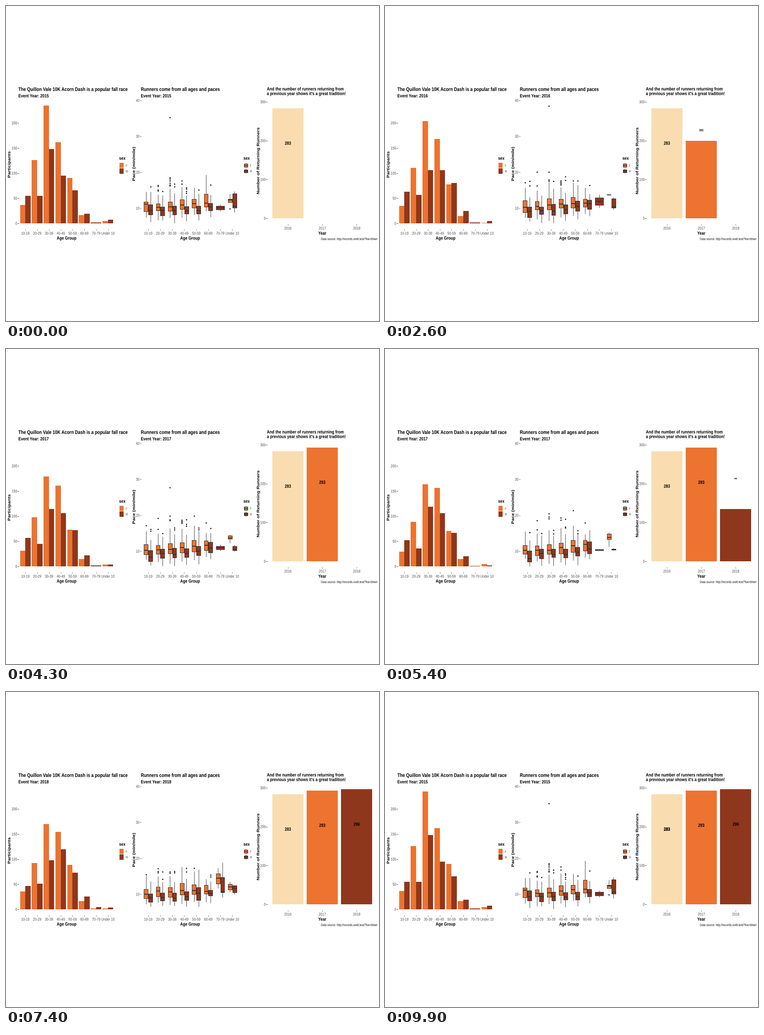
A matplotlib script for the animation above (10000 ms loop, 815 by 687 pixels).

```python
import numpy as np
import matplotlib.pyplot as plt
from matplotlib.animation import FuncAnimation
from matplotlib.collections import LineCollection, PolyCollection
from matplotlib.patches import PathPatch, Rectangle
from matplotlib.path import Path
from matplotlib.textpath import TextPath
from matplotlib.transforms import Affine2D

W, H, DPI = 815, 687, 64
FRAMES, INTERVAL = 100, 100
PX = 72 / DPI          # one pixel in points
ASPECT = 1.22          # the whole plot is taller than wide by this much

CREAM, ORANGE, BROWN = "#f9ddb0", "#ec7330", "#8f371c"
INK, AXIS = "#333333", "#4d4d4d"
AGES = ["10-19", "20-29", "30-39", "40-49", "50-59", "60-69", "70-79", "Under 10"]
YEARS = [2015, 2016, 2017, 2018]
WINDOWS = [(8, 25), (34, 49), (58, 74), (83, 99)]   # frames of each year change

# Runners per age group
WOMEN = [
    [37, 126, 234.5, 162, 90, 16, None, 5],
    [35, 111, 203.5, 168, 78, 15, None, 1],
    [29, 89, 163.5, 156, 70, 15, None, 5],
    [36, 92, 170, 154, 89, 16, 2, 2],
]
MEN = [
    [55, 55, 148, 95, 66, 19, 2, 7],
    [63, 57, 106, 106, 80, 25, 2, 5],
    [52, 36, 119, 106, 67, 20, 1, 2],
    [47, 51, 98, 120, 73, 26, 5, 4],
]

# Pace rows: low, quartiles, high, then any outliers
PACE_2015 = [
    [(7.4, 9.1, 11.1, 11.8, 14.6),
     (6.7, 9.4, 10.3, 11.3, 13.8, 16.4, 16.1, 15.1, 14.8),
     (7.3, 9.2, 10.4, 11.8, 15.5, 35.2, 18.1, 18.5, 17.6, 17, 16.5, 16.2),
     (7.4, 9.7, 10.9, 12.4, 15.9, 17.7, 16.8),
     (8.2, 10.1, 11.3, 12.6, 15.7),
     (9.2, 10.4, 11.4, 14, 19.3),
     None,
     (11.6, 11.6, 12.3, 12.5, 14, 9.9)],
    [(6.2, 8.2, 9.4, 11, 14.6, 16),
     (6.7, 7.9, 9.3, 10.4, 13.6, 14.7),
     (5.9, 8.2, 9.4, 10.6, 14.2, 16.8, 16),
     (6.4, 8.5, 9.2, 10.5, 13.6, 15.7, 15.3, 14.7, 14.2),
     (6.7, 8.5, 9.4, 10.7, 14.1, 15.1),
     (7.6, 9.4, 10.4, 11.4, 13.7, 16.5),
     (9.2, 9.6, 10.1, 10.6, 11),
     (8.9, 10.1, 10.5, 14.1, 14.7)],
]
PACE_2016 = [
    [(7.5, 8.9, 10.3, 12.2, 15.7, 17.1),
     (6.9, 9.6, 10.5, 11.9, 15, 20.1, 16.3),
     (6.6, 9.6, 10.9, 12.7, 17.2, 20.1, 38.5, 17.9, 17.5),
     (7.5, 10.1, 11.1, 12.5, 15.9, 17.7, 17.3, 16.9, 16.5),
     (7.9, 10.1, 11.3, 13, 17.1, 17.6),
     (8.5, 10.4, 11.4, 12.6, 15.7),
     None,
     (13.7, 13.7, 13.7, 13.7, 13.7)],
    [(6.3, 7.4, 9.1, 10.4, 13.2, 17.5, 16.2),
     (5.9, 8.3, 9.3, 10.4, 13.6),
     (5.9, 8.1, 9.2, 11.2, 15.5, 17.5),
     (6.5, 8.5, 9.6, 11, 14.3, 18.8, 17.8),
     (6.9, 9.2, 10.5, 12, 16.5, 17.6),
     (7.8, 9.8, 11.3, 12.3, 14, 16.4),
     (10.1, 10.9, 11.9, 12.9, 13.8),
     (9.6, 10.1, 10.4, 12.7, 13.1)],
]
PACE_2017 = [
    [(7.9, 9.2, 10.2, 11.7, 15.5),
     (7.2, 8.9, 10.3, 11.5, 15, 18.6, 16),
     (6.5, 9.2, 10.3, 11.9, 15.9, 19.6, 20.5, 19),
     (7, 9.4, 11, 12.3, 16.5, 19.3, 18.7),
     (7.4, 9.8, 11.5, 13, 17.1, 21.4),
     (8.4, 10.1, 11.9, 13.1, 14.7, 17.9),
     None,
     (11.3, 13.3, 13.8, 14.8, 15.2)],
    [(5.8, 7.1, 7.9, 10.1, 13.1, 15.2),
     (6, 8, 9.4, 10.7, 14.5, 15),
     (5.9, 8.3, 9.1, 10.6, 14.3, 15.9, 14.9),
     (6.2, 8.2, 9.1, 10.6, 14.8, 18.9, 16.5, 16.7),
     (6.2, 8.7, 9.7, 11.1, 15, 15.8, 15),
     (7.8, 9.4, 10.6, 12.7, 15.9),
     (10.2, 10.3, 10.4, 10.5, 10.7),
     (10.2, 10.4, 10.4, 10.6, 10.9)],
]
PACE_2018 = [
    [(7.3, 8.9, 10, 11.4, 15.1, 15.5),
     (7.7, 9.4, 10.9, 12, 15, 17.1, 16.4, 16),
     (7.1, 9.2, 10.7, 11.9, 15.1, 16.3, 15.9),
     (7.3, 9.9, 11, 13.1, 17.6),
     (7.9, 10, 11, 12.7, 16.4, 17.3),
     (7.8, 10.1, 10.8, 12.6, 14.2),
     (11.6, 12.9, 14.5, 15.7, 17.3),
     (10.6, 11.3, 12, 12.8, 13.6)],
    [(6.6, 7.8, 9, 10.1, 13.6),
     (6.8, 8.2, 9.1, 10.4, 13.4, 16.3, 14.2),
     (6.8, 8.1, 8.9, 10.4, 13.4, 16.4, 16),
     (6.6, 8.3, 9.4, 10.8, 14.3, 17.3, 16.3),
     (6.6, 8.3, 10.3, 11.9, 16.9),
     (7.6, 9.6, 10.3, 11.1, 13.6, 15.3, 14.9),
     (9.1, 10.5, 10.6, 14.7, 18.8),
     (10, 10.5, 11.7, 12.4, 12.5)],
]
PACES = [PACE_2015, PACE_2016, PACE_2017, PACE_2018]

fig = plt.figure(figsize=(W / DPI, H / DPI), dpi=DPI, facecolor="white")
ax = fig.add_axes([0, 0, 1, 1])
ax.set_xlim(0, W)
ax.set_ylim(H, 0)
ax.axis("off")


def count_y(n):
    return 474 - 1.0945 * n


def pace_y(v):
    return 441 - 7.84 * (np.asarray(v) - 10)


def return_y(n):
    return 463 - 0.8465 * n


def glyphs(s, x, y, size, bold=False, ha="left", turn=0, mid=False):
    font = {"family": "Liberation Sans", "weight": "bold" if bold else "normal"}
    path = TextPath((0, 0), s, size=size, prop=font)
    (x0, y0), (x1, y1) = path.vertices.min(axis=0), path.vertices.max(axis=0)
    dx = {"left": 0, "center": -(x0 + x1) / 2, "right": -x1}[ha]
    dy = -(y0 + y1) / 2 if mid else 0
    move = Affine2D().translate(dx, dy).rotate_deg(turn).scale(1, -ASPECT).translate(x, y)
    return move.transform_path(path)


# Static text and ticks are gathered here and added as a few artists
texts = {"black": [], AXIS: []}
ticks = []


def text(*args, color="black", **style):
    texts[color].append(glyphs(*args, **style))


def ink(path, color="black"):
    return ax.add_artist(PathPatch(path, facecolor=color, linewidth=0, zorder=5))


def rect(x, y, w, h, color, **style):
    style = {"linewidth": 0, **style}
    return ax.add_artist(Rectangle((x, y), w, h, facecolor=color, **style))


def lines(segments, width, z):
    group = LineCollection(segments, colors=INK, linewidths=width * PX, zorder=z)
    return ax.add_collection(group, autolim=False)


def y_axis(x, values, to_y):
    for v in values:
        y = float(to_y(v))
        ticks.append([(x - 2.5, y), (x, y)])
        text(str(v), x - 3.5, y, 7.2, ha="right", mid=True, color=AXIS)


def x_axis(y, centers, names):
    for x, name in zip(centers, names):
        ticks.append([(x, y), (x, y + 2.5)])
        text(name, x, y + 11.8, 7.15, ha="center", color=AXIS)


# Static parts
bar_x = 42.2 + 25.77 * np.arange(8)
box_x = 310.6 + 26.25 * np.arange(8)
year_x = 615.8 + 75.2 * np.arange(3)
BAR_HALF, BOX_HALF, RETURN_W = 11.6, 9.8, 68

text("The Quillon Vale 10K Acorn Dash is a popular fall race", 27, 185.3, 9.3, bold=True)
text("Runners come from all ages and paces", 294.6, 185.3, 9.3, bold=True)
text("And the number of runners returning from", 570, 184.2, 8.38, bold=True)
text("a previous year shows it's a great tradition!", 570, 194.3, 8.38, bold=True)
text("Participants", 9.6, 346, 8.3, bold=True, ha="center", turn=90)
text("Pace (min/mile)", 282, 344.7, 8.35, bold=True, ha="center", turn=90)
text("Number of Returning Runners", 553.6, 338, 8.35, bold=True, ha="center", turn=90)
text("Age Group", 132.2, 509.5, 8.35, bold=True, ha="center")
text("Age Group", 402, 509.5, 8.35, bold=True, ha="center")
text("Year", 691, 498.8, 8.35, bold=True, ha="center")
text("Data source: http://records.ovelt.test/?kw=bhwrr", 812, 510.4, 5.85, ha="right")

y_axis(27.7, [0, 50, 100, 150, 200], count_y)
y_axis(295, [10, 20, 30, 40], pace_y)
y_axis(570.7, [0, 100, 200, 300], return_y)
x_axis(486.8, bar_x, AGES)
x_axis(486.8, box_x, AGES)
x_axis(475.7, year_x, ["2016", "2017", "2018"])

text("sex", 247.2, 335.3, 8.3, bold=True)
text("sex", 518.8, 335.3, 8.3, bold=True)
key_mids = []
for y, name, color in [(347.7, "F", ORANGE), (359.9, "M", BROWN)]:
    rect(247.8, y - 5.7, 9.4, 11.4, color)
    rect(520.2, y - 3.4, 7.6, 6.8, color, edgecolor=INK, linewidth=PX, zorder=3)
    ticks.append([(524, y - 5.5), (524, y + 5.5)])
    key_mids.append([(520, y), (528, y)])
    text(name, 261.6, y + 2.8, 5.8, color=AXIS)
    text(name, 532.8, y + 2.8, 5.8, color=AXIS)

for color, paths in texts.items():
    ink(Path.make_compound_path(*paths), color)
lines(ticks, 0.9, 2)
lines(key_mids, 1.6, 4)

# Moving parts
subtitle_paths = {
    year: Path.make_compound_path(*[
        glyphs(f"Event Year: {year}", x, 199.3, 8.37, bold=True) for x in (27, 294.6)])
    for year in YEARS}
subtitle = ink(subtitle_paths[2015])
bars = [[rect(0, 0, 0, 0, c) for _ in AGES] for c in (ORANGE, BROWN)]
whiskers = lines([], 0.9, 2)
boxes = ax.add_collection(
    PolyCollection([], edgecolors=INK, linewidths=PX, zorder=3), autolim=False)
medians = lines([], 1.9, 4)
dots = ax.scatter([], [], s=(2.9 * PX) ** 2, color="#222222", linewidths=0, zorder=4)

RETURNS = [283, 293, 296]
LIFTS = [62, 62, 10]
columns = [rect(x - RETURN_W / 2, 463, RETURN_W, 0, c)
           for x, c in zip(year_x, (CREAM, ORANGE, BROWN))]
label_paths = [glyphs(str(n), 0, 0, 8.2, bold=True, ha="center", mid=True)
               for n in RETURNS]
labels = [ink(path) for path in label_paths]
echo = ink(label_paths[0])


def lerp(a, b, p):
    return a + (b - a) * p


def ramp(frame, start, end):
    return min(max((frame - start) / (end - start), 0), 1)


def phase(frame):
    """Index of the current year and progress towards the next one."""
    for k, (start, end) in enumerate(WINDOWS):
        if frame < end:
            return k, ramp(frame, start, end)
    return 0, 0


def left_edge(center, half, sex, women_a, women_b, p):
    """Men fill the whole slot where there are no women."""
    if sex == 0:
        return center - half
    edges = [center - half * (w is None) for w in (women_a, women_b)]
    return lerp(*edges, p)


def tween_dots(a, b, p):
    if p == 0:
        return np.array(a)
    a, b = a or b, b or a
    n = max(len(a), len(b))
    return lerp(np.resize(a, n), np.resize(b, n), p) if n else np.array([])


def draw_counts(k, j, p):
    for sex, data in enumerate((WOMEN, MEN)):
        for i, bar in enumerate(bars[sex]):
            a, b = data[k][i], data[j][i]
            bar.set_visible(a is not None)
            if a is None:
                continue
            x = left_edge(bar_x[i], BAR_HALF, sex, WOMEN[k][i], WOMEN[j][i], p)
            right = bar_x[i] + BAR_HALF * sex
            top = count_y(lerp(a, a if b is None else b, p))
            bar.set_bounds(x, top, right - x, 474 - top)


def draw_paces(k, j, p):
    stems, rects, mids, spots, fills = [], [], [], [], []
    for sex, color in enumerate((ORANGE, BROWN)):
        for i, center in enumerate(box_x):
            a, b = PACES[k][sex][i], PACES[j][sex][i]
            if a is None:
                continue
            b = b or a
            x0 = left_edge(center, BOX_HALF, sex, PACES[k][0][i], PACES[j][0][i], p) + 0.5
            x1 = center + BOX_HALF * sex - 0.5
            xm = (x0 + x1) / 2
            low, q1, med, q3, high = pace_y(lerp(np.array(a[:5]), np.array(b[:5]), p))
            stems += [[(xm, low), (xm, q1)], [(xm, q3), (xm, high)]]
            rects.append([(x0, q1), (x1, q1), (x1, q3), (x0, q3)])
            mids.append([(x0, med), (x1, med)])
            fills.append(color)
            spots += [(xm, y) for y in pace_y(tween_dots(a[5:], b[5:], p))]
    whiskers.set_segments(stems)
    boxes.set_verts(rects)
    boxes.set_facecolor(fills)
    medians.set_segments(mids)
    dots.set_offsets(spots)


def place_label(patch, i, p):
    patch.set_visible(p > 0)
    y = return_y(RETURNS[i]) + 75.6 - LIFTS[i] * (1 - p)
    move = Affine2D().scale(p).translate(year_x[i], y)
    patch.set_path(move.transform_path(label_paths[i]))


def draw_returns(frame):
    growth = [1, ramp(frame, 11, 33), ramp(frame, 44, 66)]
    for i, p in enumerate(growth):
        top = return_y(RETURNS[i] * p)
        columns[i].set_y(top)
        columns[i].set_height(463 - top)
        place_label(labels[i], i, p)
    place_label(echo, 0, ramp(frame, 78, 99))


def update(frame):
    k, p = phase(frame)
    j = (k + 1) % 4
    subtitle.set_path(subtitle_paths[YEARS[j if p >= 0.5 else k]])
    draw_counts(k, j, p)
    draw_paces(k, j, p)
    draw_returns(frame)
    return []


anim = FuncAnimation(fig, update, frames=FRAMES, interval=INTERVAL,
                     repeat=True, repeat_delay=0, blit=False)
plt.show()
```
